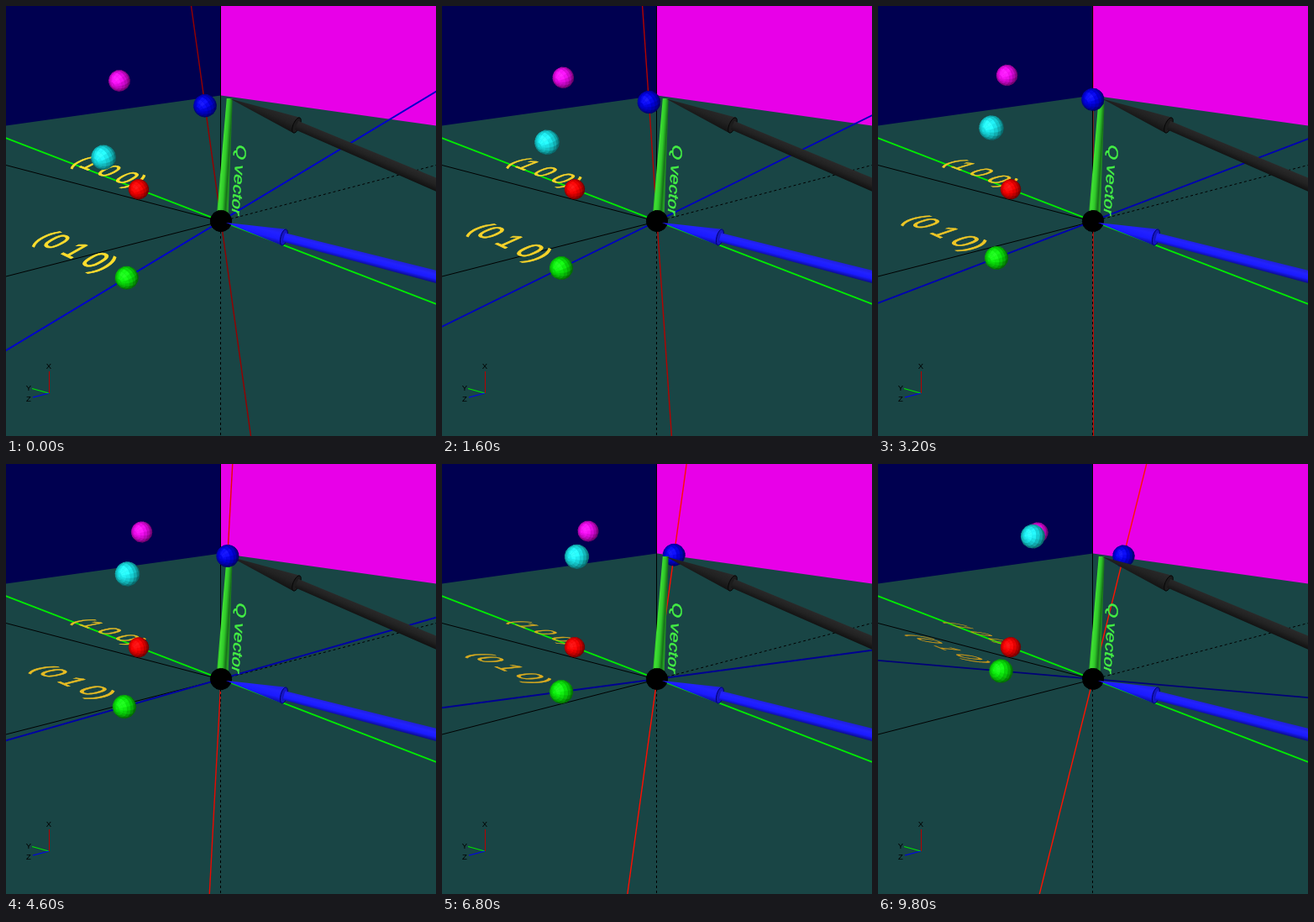
An HTML page with a canvas that plays this animation: 512x512 px, repeating every 10 s.

```html
<!DOCTYPE html>
<html lang="en">
<head>
<meta charset="utf-8">
<title>Rotating lattice and Q vector</title>
<style>
  html, body { margin: 0; width: 100%; height: 100%; overflow: hidden; background: #194545; }
  canvas { display: block; }
</style>
</head>
<body>
<canvas id="stage" width="512" height="512"></canvas>
<script>
const ctx = document.getElementById('stage').getContext('2d');
const FONT = '"Liberation Sans", Arial, sans-serif';
const STEP_MS = 200, STEPS = 50, DEG = Math.PI / 180;

// View space: x right, y up, z towards the viewer; one unit is one lattice spacing.
const CENTER = 256, DISTANCE = 8.68, FOCAL = 1300;
const add = (...vs) => [0, 1, 2].map(k => vs.reduce((sum, v) => sum + v[k], 0));
const mul = (v, s) => v.map(c => c * s);
const mix = (u, a, v, b) => add(mul(u, a), mul(v, b));
const scaleAt = p => FOCAL / (DISTANCE - p[2]);
const project = p => [CENTER + p[0] * scaleAt(p), CENTER - p[1] * scaleAt(p)];

// Laboratory axes seen from 15 degrees above, tilted by the Bragg angle.
const elev = 15 * DEG, bragg = 5.3 * DEG, h = Math.SQRT1_2;
const labX = [0, Math.cos(elev), Math.sin(elev)];
const labY = [-h, h * Math.sin(elev), -h * Math.cos(elev)];
const labZ = [-h, -h * Math.sin(elev), h * Math.cos(elev)];
const spin = mix(labY, Math.cos(bragg), labX, Math.sin(bragg));
const q = mix(labX, Math.cos(bragg), labY, -Math.sin(bragg));

function polygon(points, fill) {
  ctx.beginPath();
  points.forEach(p => ctx.lineTo(p[0], p[1]));
  ctx.closePath();
  ctx.fillStyle = fill;
  ctx.fill();
}

function line(x1, y1, x2, y2, color, width = 1, dash = []) {
  ctx.beginPath();
  ctx.setLineDash(dash);
  ctx.moveTo(x1, y1);
  ctx.lineTo(x2, y2);
  ctx.strokeStyle = color;
  ctx.lineWidth = width;
  ctx.stroke();
  ctx.setLineDash([]);
}

// Endless line through the origin; perspective keeps its direction.
function axis(dir, color, width) {
  const s = 500 / Math.hypot(dir[0], dir[1]), dx = dir[0] * s, dy = -dir[1] * s;
  line(CENTER - dx, CENTER - dy, CENTER + dx, CENTER + dy, color, width);
}

// Text lying in the plane spanned by right and up, placed letter by letter.
function planeText(text, start, right, up, em, color) {
  ctx.font = '100px ' + FONT;
  ctx.fillStyle = ctx.strokeStyle = color;
  ctx.lineWidth = 2.5;
  let pos = start;
  for (const ch of text) {
    const o = project(pos), k = em / 100;
    const r = project(add(pos, mul(right, 0.01))), u = project(add(pos, mul(up, 0.01)));
    const slope = (a, i) => (a[i] - o[i]) * 100 * k;
    ctx.setTransform(slope(r, 0), slope(r, 1), -slope(u, 0), -slope(u, 1), o[0], o[1]);
    ctx.fillText(ch, 0, 0);
    ctx.strokeText(ch, 0, 0);
    pos = add(pos, mul(right, ctx.measureText(ch).width * k));
  }
  ctx.setTransform(1, 0, 0, 1, 0, 0);
}

// Flat-shaded sphere whose pole follows the crystal.
function ball({ at, rgb }, [ax, ay, pole]) {
  const [cx, cy] = project(at), radius = 0.085 * scaleAt(at), ROWS = 9, COLS = 16;
  const normal = (row, col) => {
    const lat = Math.PI * row / ROWS, lon = 2 * Math.PI * col / COLS;
    return add(mul(ax, Math.sin(lat) * Math.cos(lon)),
               mul(ay, Math.sin(lat) * Math.sin(lon)), mul(pole, Math.cos(lat)));
  };
  ctx.beginPath();
  ctx.arc(cx, cy, radius - 0.4, 0, 7);
  ctx.fillStyle = `rgb(${mul(rgb, 0.6)})`;
  ctx.fill();
  for (let row = 0; row < ROWS; row++) {
    for (let col = 0; col < COLS; col++) {
      const n = normal(row + 0.5, col + 0.5);
      if (n[2] <= 0) continue;
      const lit = Math.max(0, -0.25 * n[0] + 0.25 * n[1] + 0.93 * n[2]);
      const gloss = Math.max(...rgb) ? 30 * lit ** 10 : 0;
      const shade = rgb.map(c => Math.min(255, c * (0.45 + 0.6 * lit) + gloss));
      const color = `rgb(${shade.map(Math.round)})`;
      const corners = [[0, 0], [0, 1], [1, 1], [1, 0]].map(([a, b]) => {
        const v = normal(row + a, col + b);
        return [cx + v[0] * radius, cy - v[1] * radius];
      });
      polygon(corners, color);
      ctx.strokeStyle = color;
      ctx.lineWidth = 0.5;
      ctx.stroke();
    }
  }
}

function across(x1, y1, x2, y2, colors) {
  const g = ctx.createLinearGradient(x1, y1, x2, y2);
  colors.forEach((c, i) => g.addColorStop(i / (colors.length - 1), c));
  return g;
}

// The shaft comes towards the viewer, so the back of the cone is visible.
function arrow(tip, base, end, colors, cap, rim) {
  const dx = end[0] - base[0], dy = end[1] - base[1], len = Math.hypot(dx, dy);
  const nx = -dy / len, ny = dx / len;
  const side = (p, w) => [p[0] + nx * w, p[1] + ny * w];
  const fill = w => across(...side(base, -w), ...side(base, w), colors);
  polygon([tip, side(base, -10), side(base, 10)], fill(10));
  ctx.beginPath();
  ctx.ellipse(base[0], base[1], 4, 9.8, Math.atan2(dy, dx), 0, 7);
  ctx.fillStyle = cap;
  ctx.fill();
  ctx.strokeStyle = rim;
  ctx.lineWidth = 1;
  ctx.stroke();
  polygon([side(base, -5.5), side(end, -7.5), side(end, 7.5), side(base, 5.5)], fill(7));
}

function drawWalls() {
  ctx.fillStyle = '#194545';
  ctx.fillRect(0, 0, 512, 512);
  polygon([[0, 0], [256, 0], [256, 106.5], [0, 142.5]], '#000050');
  polygon([[256, 0], [512, 0], [512, 142.5], [256, 106.5]], '#e800e8');
}

function drawLabAxes() {
  line(255.5, 0, 255.5, 256, '#000');
  line(0, 189.5, 256, 256.5, '#000');
  line(0, 322, 256, 256.5, '#000');
  line(255.5, 256, 255.5, 512, '#000', 1, [3, 3]);
  line(256, 256.5, 512, 189.5, '#000', 1, [3, 3]);
}

function drawTriad() {
  line(51.5, 461, 51.5, 435, '#b80000');
  line(51, 461, 31, 455.5, '#00e600', 1.2);
  line(51, 461, 32, 466, '#0000f0', 1.2);
  ctx.font = '9.5px ' + FONT;
  ctx.fillStyle = '#000';
  ctx.textAlign = 'center';
  ctx.fillText('X', 51, 431.5);
  ctx.fillText('Y', 27, 458);
  ctx.fillText('Z', 27, 471);
  ctx.textAlign = 'left';
}

function drawBeams() {
  polygon([[262.8, 110], [269.8, 110], [264.5, 250], [250.8, 250]],
    across(254, 180, 269, 181, ['#22a01c', '#3fe034', '#2fc828', '#17701a', '#2bb426']));
  arrow([267, 110.5], [346, 142], [520, 216], ['#2a2a2a', '#222', '#121212'], '#1c1c1c', '#060606');
}

function draw(step) {
  const progress = step / (STEPS - 1), angle = (-15 + 0.6 * step) * DEG;
  const c = Math.cos(angle), s = Math.sin(angle);
  const axisB = mix(labZ, c, q, s), axisC = mix(q, c, labZ, -s);
  const frame = [axisC, spin, axisB];
  const fade = (from, to) => Math.round(from + (to - from) * progress);

  drawWalls();
  axis(axisC, `rgb(${Math.min(255, fade(150, 330))},${fade(0, 20)},0)`, 1.4);
  drawLabAxes();
  axis(axisB, `rgb(0,0,${fade(205, 120)})`, 1.9);
  axis(spin, '#00ea00', 1.9);

  const gold = `rgb(${fade(255, 205)},${fade(222, 152)},${fade(45, 25)})`;
  const right = mul(spin, -1), up = mul(axisB, -1);
  planeText('(1 0 0)', mix(spin, 1.93, axisB, 0.01), right, up, 0.296, gold);
  planeText('(0 1 0)', mix(spin, 1.08, axisB, 1.07), right, up, 0.296, gold);

  ball({ at: spin, rgb: [255, 0, 0] }, frame);
  ball({ at: add(spin, axisC), rgb: [245, 10, 245] }, frame);
  ball({ at: axisB, rgb: [10, 240, 10] }, frame);
  ball({ at: add(axisB, axisC), rgb: [25, 235, 240] }, frame);

  // The blue node passes behind the Q vector once it has crossed it.
  const node = { at: axisC, rgb: [0, 0, 235] };
  if (angle >= 0) ball(node, frame);
  drawBeams();
  if (angle < 0) ball(node, frame);

  ball({ at: [0, 0, 0], rgb: [0, 0, 0] }, frame);
  arrow([262, 258], [331, 275.5], [520, 324.5], ['#2020d8', '#2222ff', '#1a1aff', '#0c0c90'], '#1616c0', '#00006a');
  planeText('Q vector', mix(q, 0.66, spin, -0.11), mul(q, -1), right, 0.15, '#44f044');
  drawTriad();
}

function tick() {
  draw(Math.floor(performance.now() / STEP_MS) % STEPS);
  requestAnimationFrame(tick);
}
tick();
</script>
</body>
</html>
```
